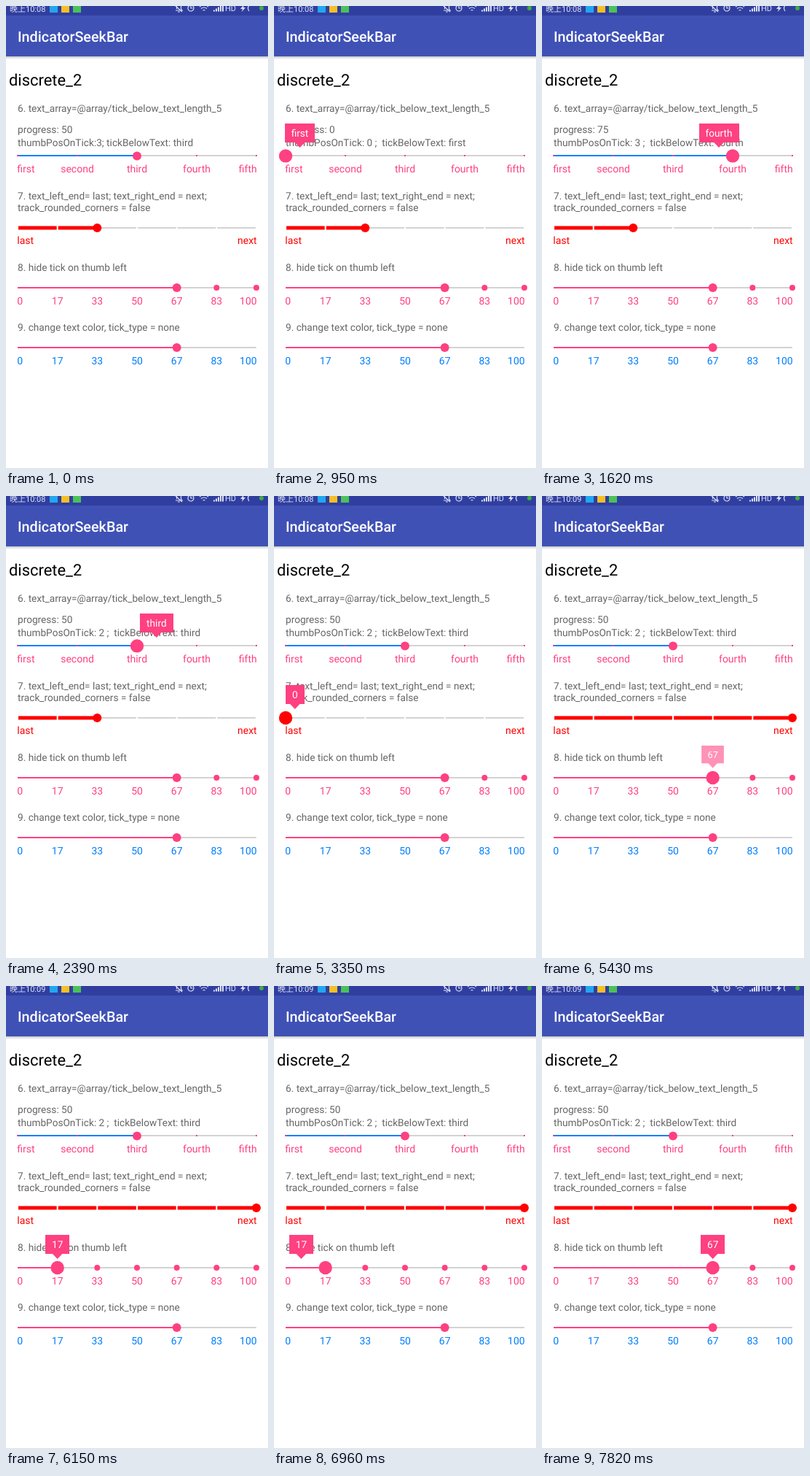
Animation, 360 px wide and 633 px high, one loop 8000 ms. Source, as an HTML page:

```html
<!DOCTYPE html>
<html lang="en">
<head>
<meta charset="utf-8">
<title>Discrete seek bars</title>
<style>
  html, body { margin: 0; width: 100%; height: 100%; overflow: hidden; background: #fff; }
  svg { display: block; width: 360px; height: 633px; }
  text {
    font: 13.65px Roboto, "Noto Sans CJK SC", "Noto Sans CJK", sans-serif;
    white-space: pre; text-rendering: geometricPrecision;
  }
  .note { fill: #666; }
  .label { font-size: 14px; }
  .status text { font-size: 11px; fill: #dfe3f4; }
  .line { fill: none; stroke: #dfe3f4; stroke-width: 1.2; }
</style>
</head>
<body>
<svg id="stage" viewBox="0 0 360 633" xmlns="http://www.w3.org/2000/svg">
  <defs>
    <linearGradient id="shade" x2="0" y2="1">
      <stop offset="0" stop-color="#000" stop-opacity=".22"/>
      <stop offset="1" stop-color="#000" stop-opacity="0"/>
    </linearGradient>
  </defs>
  <rect width="360" height="633" fill="#fff"/>
  <rect y="69" width="360" height="4" fill="url(#shade)"/>
  <rect width="360" height="69" fill="#3f51b5"/>
  <rect width="360" height="13" fill="#303f9f"/>
  <g class="status">
    <text id="clock" x="5" y="7.500">晚上10:08</text>
    <rect x="60" y="-2" width="11" height="11" fill="#22a7f0"/>
    <rect x="76" y="-2" width="11" height="11" fill="#f6bf26"/>
    <rect x="92" y="-2" width="11" height="11" fill="#4cc15a"/>
    <path class="line" d="M233 6h9l-1.5-2V0M234.500 4V0M236 8h3M232-1l10 9"/>
    <circle class="line" cx="254" cy="3" r="4"/>
    <path class="line" d="M254 0v3h2.500M249 0l2-2M259 0l-2-2"/>
    <path class="line" d="M266 1q6-5 12 0M268 3.500q4-3 8 0M270.500 6q1.500-1 3 0"/>
    <path class="line" d="M286 7.500v-2M289 7.500v-4M292 7.500v-6M295 7.500v-8M298 7.500v-9" style="stroke-width:2"/>
    <text x="301" y="7">HD</text>
    <path d="M327-2l-5 6h3l-1 4 5-6h-3z" fill="#dfe3f4"/>
    <path class="line" d="M334-1q-3 4 0 8"/>
    <circle cx="351" cy="3" r="3" fill="#3fae3f"/>
  </g>
  <text x="16" y="49" fill="#fff" style="font-size:19.8px;font-weight:500">IndicatorSeekBar</text>
  <text x="4" y="108.500" style="font-size:21.9px">discrete_2</text>
  <g class="note">
    <text x="16" y="145">6. text_array=@array/tick_below_text_length_5</text>
    <text id="progress" x="16" y="174"></text>
    <text id="detail" x="16" y="192"></text>
    <text x="16" y="265">7. text_left_end= last; text_right_end = next;</text>
    <text x="16" y="281">track_rounded_corners = false</text>
    <text x="16" y="363">8. hide tick on thumb left</text>
    <text x="16" y="445">9. change text color, tick_type = none</text>
  </g>
</svg>
<script>
const LOOP = 8000, REFRESH = 95, LEAD = 50;
const LEFT = 16, RIGHT = 344, SPAN = RIGHT - LEFT, WIDTH = 360;
const PINK = '#ff4081', RED = '#ff0000', BLUE = '#007fff', GRAY = '#d3d3d3';
const stage = document.getElementById('stage');
const clamp = (v, lo, hi) => Math.max(lo, Math.min(hi, v));
const slow = u => 1 - (1 - clamp(u, 0, 1)) ** 1.7;
const write = (id, text) => { document.getElementById(id).textContent = text; };

function set(node, attrs) {
  for (const key in attrs) node.setAttribute(key, attrs[key]);
}
function add(parent, tag, attrs, text = '') {
  const node = document.createElementNS('http://www.w3.org/2000/svg', tag);
  set(node, attrs);
  node.textContent = text;
  return parent.appendChild(node);
}

// One kind of tick mark per bar.
const markers = {
  point: (x, y) => add(stage, 'rect', { x: x - 1, y: y - 1, width: 2, height: 2, fill: PINK }),
  gap: (x, y) => add(stage, 'rect', { x: x - 1, y: y - 3, width: 2, height: 6, fill: '#fff' }),
  dot: (x, y) => add(stage, 'circle', { cx: x, cy: y, r: 4, fill: PINK }),
  none: () => null
};

class SeekBar {
  // strokes: [start, tick, duration]; without a duration the thumb jumps.
  constructor({ y, names, labels = names, from, strokes = [], press = LOOP, release = LOOP,
                color, track = color, thumb = PINK, thick = 2, mark = 'none', drop = 23 }) {
    Object.assign(this, { y, names, from, strokes, press, release, mark });
    this.steps = names.length - 1;
    const line = Math.round(y);
    add(stage, 'rect', { x: LEFT, y: line - 1, width: SPAN, height: 2, fill: GRAY });
    this.fill = add(stage, 'rect', { x: LEFT, y: line - thick / 2, height: thick, fill: track });
    this.marks = names.map((_, i) => markers[mark](this.tickX(i), line));
    this.thumb = add(stage, 'circle', { cy: y, fill: thumb });
    const last = labels.length - 1;
    labels.forEach((label, i) => add(stage, 'text', {
      class: 'label', y: Math.floor(y + drop), fill: color,
      x: LEFT + SPAN * i / last + (i === last ? 0.7 : i ? 0 : -0.7),
      'text-anchor': i === last ? 'end' : i ? 'middle' : 'start'
    }, label));
  }

  tickX(i) { return LEFT + SPAN * i / this.steps; }

  addPopup() {
    this.popup = add(stage, 'g', {});
    this.box = add(this.popup, 'path', { fill: PINK });
    this.top = Math.floor(this.y - 44.4);
    this.value = add(this.popup, 'text', { y: this.top + 18, fill: '#fff', 'text-anchor': 'middle' });
  }

  // Finger position, moving in screen refreshes; lead looks a little ahead.
  finger(t, lead = 0) {
    let tick = this.from;
    for (const [start, to, duration] of this.strokes) {
      if (t < start) break;
      const step = Math.floor((t - start) / REFRESH) * REFRESH + lead;
      tick += (to - tick) * (duration ? slow(step / duration) : 1);
    }
    return tick;
  }

  draw(t) {
    const index = this.index = Math.round(this.finger(t, LEAD));
    const at = this.tickX(index);
    const down = t >= this.press && t < this.release;
    set(this.fill, { width: at - LEFT });
    set(this.thumb, { cx: at, r: down ? 9.2 : 6 });
    if (this.mark === 'dot')
      this.marks.forEach((m, i) => set(m, { visibility: i > index ? 'visible' : 'hidden' }));
    if (this.popup) this.drawPopup(t, down);
  }

  drawPopup(t, down) {
    const fading = t >= this.release && t < this.release + REFRESH;
    const age = Math.floor((t - this.press) / REFRESH);
    const alpha = down ? Math.min(1, 0.57 + 0.3 * age) : fading ? 0.5 : 0;
    set(this.popup, { opacity: alpha });
    if (!alpha) return;
    this.value.textContent = this.names[this.index];
    const x = this.tickX(this.finger(t));
    const half = this.value.getComputedTextLength() / 2 + 9;
    const mid = clamp(x, half, WIDTH - half);
    const left = Math.round(mid - half), right = Math.round(mid + half);
    const low = this.top + 26, cy = this.top + 14;
    const scale = 0.84 + 0.16 * alpha;
    set(this.value, { x: mid });
    set(this.box, { d: `M${left} ${this.top}H${right}V${low}H${x + 6.7}L${x} ${low + 7}L${x - 6.7} ${low}H${left}Z` });
    set(this.popup, { transform: `translate(${mid} ${cy}) scale(${scale}) translate(${-mid} ${-cy})` });
  }
}

const order = ['first', 'second', 'third', 'fourth', 'fifth'];
const percents = Array.from({ length: 7 }, (_, i) => String(Math.round(i * 100 / 6)));

const bars = [
  new SeekBar({
    y: 205.4, names: order, color: PINK, track: BLUE, mark: 'point',
    press: 380, release: 2585, from: 2,
    strokes: [[475, 0, 665], [1240, 4, 760], [2195, 2, 290]]
  }),
  new SeekBar({
    y: 304, names: percents, labels: ['last', 'next'], drop: 22, color: RED, thumb: RED,
    thick: 5, mark: 'gap', press: 2870, release: 5055, from: 2,
    strokes: [[2970, 0, 530], [3540, 4, 490], [4190, 5, 95], [4610, 6, 190]]
  }),
  new SeekBar({
    y: 386, names: percents, color: PINK, mark: 'dot', press: 5430, from: 4,
    strokes: [[5800, 3], [6010, 2], [6150, 1], [6430, 0, 190], [6865, 1, 375],
              [7250, 2], [7440, 3], [7720, 4, 95]]
  }),
  new SeekBar({ y: 468, names: percents, color: BLUE, track: PINK, from: 4 })
];
bars.slice(0, 3).forEach(bar => bar.addPopup());

let moved = false;
function draw(t) {
  bars.forEach(bar => bar.draw(t));
  const i = bars[0].index;
  moved = t > 1000 || i !== 2;
  write('clock', t < 3700 ? '晚上10:08' : '晚上10:09');
  write('progress', `progress: ${i * 25}`);
  write('detail', moved
    ? `thumbPosOnTick: ${i} ;  tickBelowText: ${order[i]}`
    : 'thumbPosOnTick:3; tickBelowText: third');
}

const begin = performance.now();
function frame() {
  draw((performance.now() - begin) % LOOP);
  requestAnimationFrame(frame);
}
frame();
</script>
</body>
</html>
```
